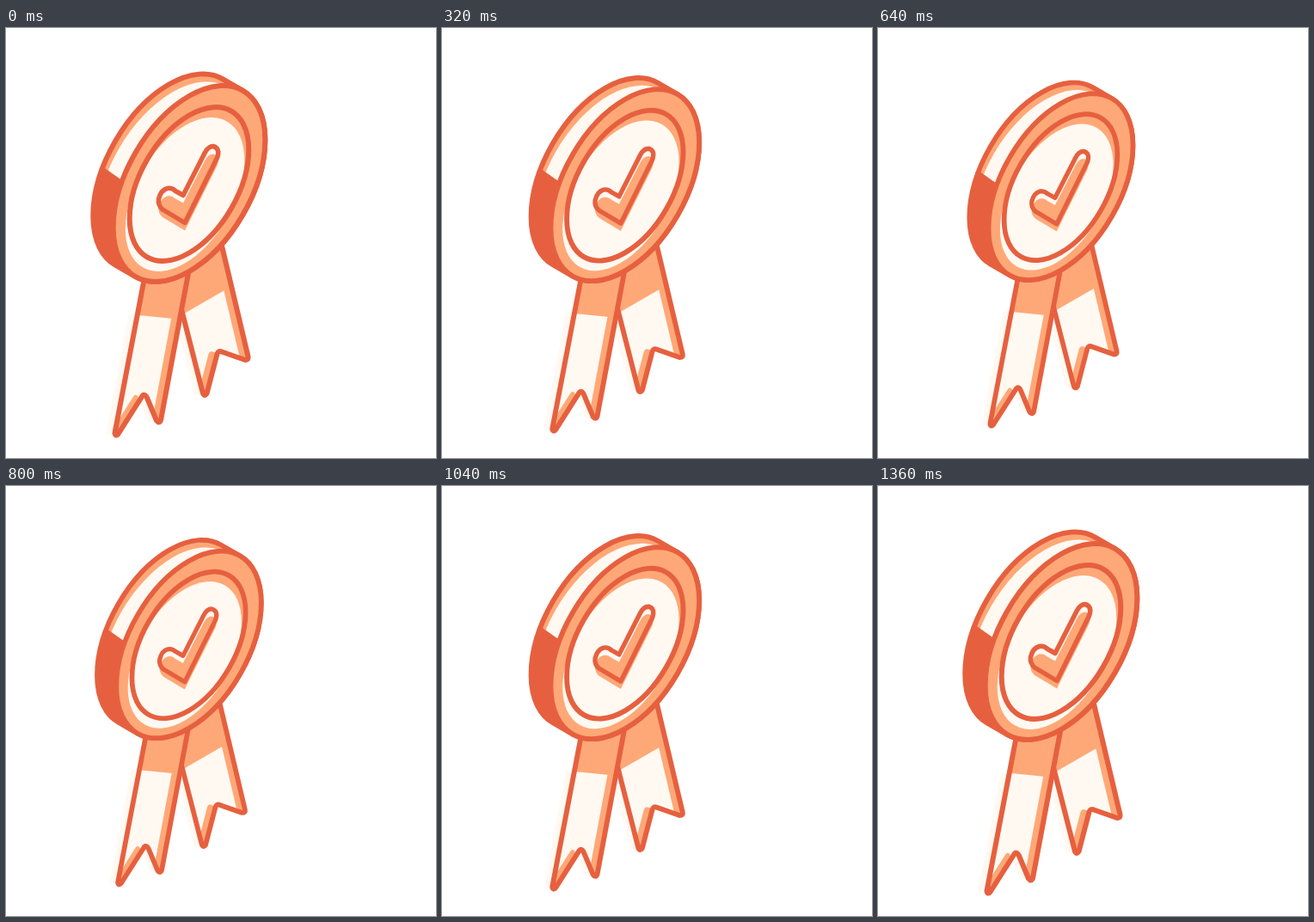
Write an HTML page that moves like this. It is 500x500 px and loops after 2000 ms.

```html
<!DOCTYPE html>
<html lang="en">
<head>
<meta charset="utf-8">
<title>Award rosette</title>
<style>
  html, body { margin: 0; width: 100%; height: 100%; overflow: hidden; background: #fff; }
  svg { display: block; width: 100%; height: 100%; }
  .line { fill: none; stroke: #e6603f; stroke-width: 6; stroke-linecap: round; stroke-linejoin: round; }
  .dark { fill: #e6603f; }
  .mid { fill: #ffa877; }
  .pale { fill: #fff9f2; }
</style>
</head>
<body>
<svg viewBox="0 0 500 500">
  <defs>
    <path id="check" d="M206 194.500 L231 145.500 Q235 137.500 241 137.500 Q249.500 140 245.500 151 L208 226.500 L182 211 Q176.500 206 177.500 199 Q180 188.500 187.500 186.500 Q193 185.500 197 189.500 Z"/>
    <path id="ribbonA" d="M163 280 L126.500 471 Q127.500 475.500 130.500 472 L157.500 429.500 Q161 423.500 164 430 L175 456.500 Q178 460.500 180 456 L213 280 Z"/>
    <path id="ribbonB" d="M195 292 L229 425 Q231 429 233.500 425 L245.500 379 Q247 374.500 251 376.500 L278 386 Q282.500 386 281.500 382 L249 245 Z"/>
    <clipPath id="lowA"><path d="M100 328.500 L240 342.500 V500 H100 Z"/></clipPath>
    <clipPath id="lowB"><path d="M150 365 L300 278.500 V500 H150 Z"/></clipPath>
    <clipPath id="clipSide"><path id="sideShape"/></clipPath>
  </defs>
  <g id="badge">
    <use href="#ribbonB" class="mid"/>
    <g clip-path="url(#lowB)"><use href="#ribbonB" class="pale" x="-10"/></g>
    <use href="#ribbonB" class="line"/>
    <use href="#ribbonA" class="mid"/>
    <g clip-path="url(#lowA)"><use href="#ribbonA" class="pale" x="-10"/></g>
    <use href="#ribbonA" class="line"/>
    <g id="medal"></g>
    <use href="#check" class="pale"/>
    <use href="#check" class="mid" y="9"/>
    <use href="#check" class="line" style="stroke-width:5.500"/>
  </g>
</svg>
<script>
  const $ = id => document.getElementById(id);
  const CX = 213, CY = 181, R = 102;   // front face centre and radius
  const DX = -23.4, DY = -13.5;        // depth of the disc

  // A circle of radius r seen on an isometric wall
  const disc = (cls, r, dx = 0, dy = 0) =>
    `<ellipse class="${cls}" rx="${r * 1.2247}" ry="${r * 0.7071}"
      transform="translate(${CX + dx} ${CY + dy}) rotate(-60)"/>`;

  // Outline swept by the front face as it moves back
  function sidePath() {
    const ax = R * 0.612, ay = -R * 1.061;
    const arc = `A ${R * 1.2247} ${R * 0.7071} -60 0`;
    return `M ${CX + ax} ${CY + ay} l ${DX} ${DY}
      ${arc} 0 ${CX - ax + DX} ${CY - ay + DY} l ${-DX} ${-DY}
      ${arc} 0 ${CX + ax} ${CY + ay} Z`;
  }

  const side = sidePath();
  $('sideShape').setAttribute('d', side);
  $('medal').innerHTML =
    `<g clip-path="url(#clipSide)">
      <path class="mid" d="${side}"/>
      ${disc('pale', R, DX + 4, DY + 9)}
      <path class="dark" d="M90 145.500 L134 176.500 L160 195 V310 H90 Z"/>
    </g>
    <path class="line" d="${side}"/>` +
    disc('mid', R) + disc('pale', 80, -5, 12.5) +
    disc('line', R) + disc('line', 80, 0, 0.5);

  const LOOP = 2000, MOVE = 1360, STEP = 40;
  const PX = 203, PY = 256, SHRINK = 0.05;

  function draw(ms) {
    const t = Math.floor((ms % LOOP) / STEP) * STEP;
    const k = t < MOVE ? (1 - Math.cos(2 * Math.PI * t / MOVE)) / 2 : 0;
    const s = 1 - SHRINK * k;
    $('badge').setAttribute('transform',
      `translate(${PX} ${PY}) scale(${s}) translate(${-PX} ${-PY})`);
  }

  let start;
  function tick(now) {
    if (start === undefined) start = now;
    draw(now - start);
    requestAnimationFrame(tick);
  }
  draw(0);
  requestAnimationFrame(tick);
</script>
</body>
</html>
```
